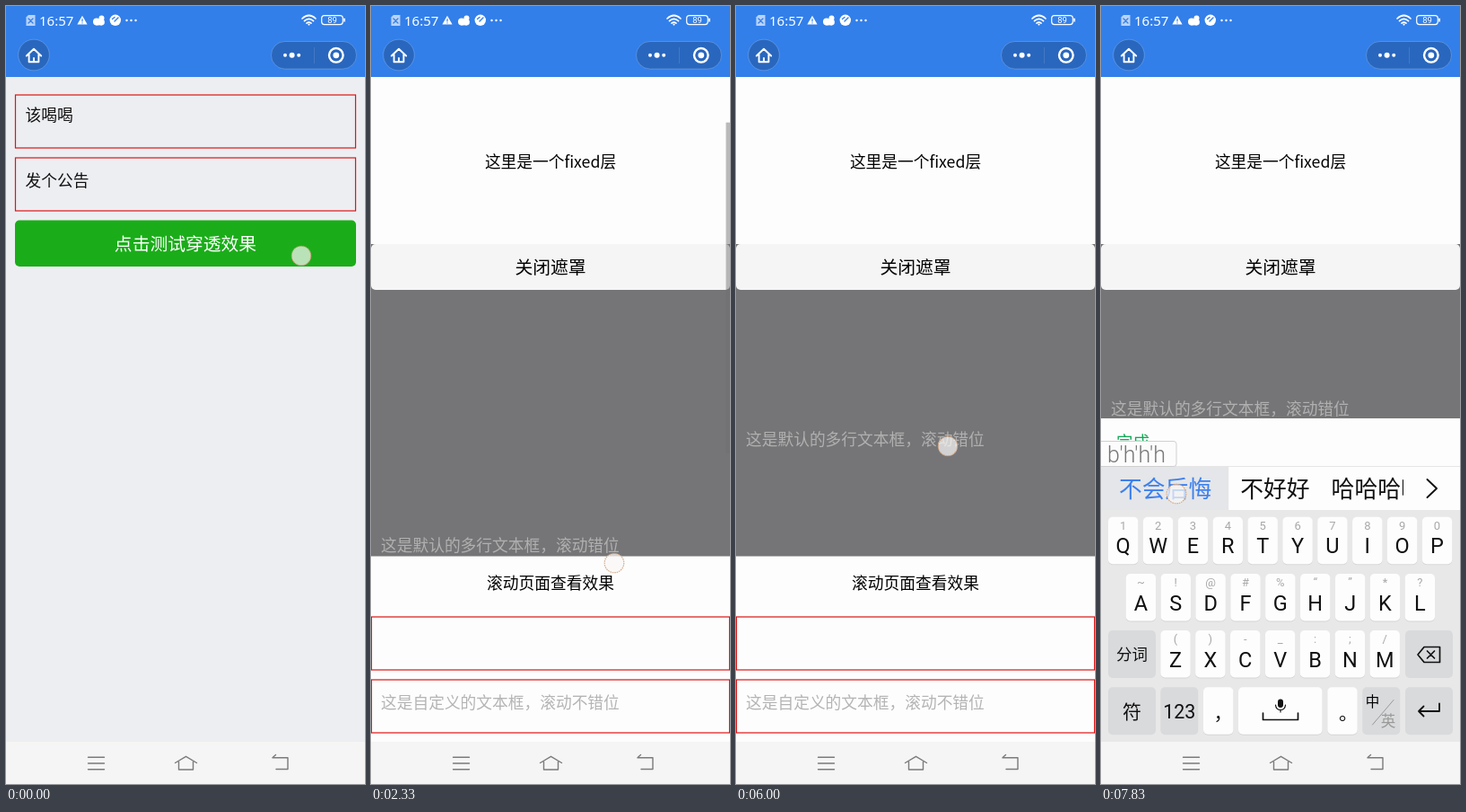
These frames come from a looping animation (400 by 866 pixels, 8000 ms). An HTML page:

```html
<!DOCTYPE html>
<html lang="zh-CN">
<head>
<meta charset="utf-8">
<style>
html, body { margin: 0; width: 100%; height: 100%; overflow: hidden; background: #edeef2; }
svg { display: block; width: 100vw; height: 100vh; font-family: "Noto Sans CJK SC", "Noto Sans CJK", "Noto Sans", sans-serif; }
.latin { font-family: Roboto, "Noto Sans", sans-serif; }
.line { fill: none; stroke-linecap: round; stroke-linejoin: round; }
</style>
</head>
<body>
<svg id="stage" viewBox="0 0 400 866" preserveAspectRatio="none"></svg>
<script>
const LOOP = 8000, FPS = 6;
const CJK = 17.73;

// Text centred vertically on y
const text = (s, x, y, size, fill = '#000', anchor = 'middle', extra = '') =>
  `<text x="${x}" y="${y + size * 0.37}" font-size="${size}" fill="${fill}" text-anchor="${anchor}" ${extra}>${s}</text>`;
const latin = (s, x, y, size, fill, anchor, extra = '') =>
  text(s, x, y, size, fill, anchor, 'class="latin" ' + extra);
const rect = (x, y, w, h, fill, r = 0, extra = '') =>
  `<rect x="${x}" y="${y}" width="${w}" height="${h}" rx="${r}" fill="${fill}" ${extra}/>`;
const dot = (x, y, r, fill, extra = '') => `<circle cx="${x}" cy="${y}" r="${r}" fill="${fill}" ${extra}/>`;
const line = (d, color = '#000', w = 1.6) =>
  `<path class="line" d="${d}" stroke="${color}" stroke-width="${w}"/>`;
const redBox = (x, y, w) => rect(x + .5, y + .5, w - 1, 59, 'none', 0, 'stroke="#dc1414" stroke-width="1.2"');

function header() {
  const blue = '#327fea', white = '#fff', glass = 'rgba(0,0,0,.19)';
  const rim = 'stroke="rgba(255,255,255,.2)"';
  return rect(0, 0, 400, 79, blue) +
    `<path d="M25 10H32.5V22H22.5V12.5Z" fill="#b9d3f8"/>` + line('M25 14L30 19M30 14L25 19', blue, 1.3) +
    text('16:57', 37, 16, 15, white, 'start', 'style="font-family:\'Noto Sans\',sans-serif"') +
    `<path d="M85 10.8L90.6 20.5H79.4Z" fill="#fff"/>` + line('M85 14.5V17M85 18.8V19', blue, 1.2) +
    dot(101, 17.5, 4, white) + dot(106.5, 18, 3.4, white) + dot(106.5, 13.5, 3, white) +
    rect(100, 17, 7, 4.4, white) +
    dot(121.8, 15.8, 6.2, white) + line('M121 17L125 13M118.5 14.5L121 12.5', blue, 1.4) +
    [134.5, 139.5, 144.5].map(x => dot(x, 16, 1.2, white)).join('') +
    line('M330 14Q337.5 7 345 14M332.5 16.7Q337.5 12 342.5 16.7M335 19.2Q337.5 17 340 19.2', white, 1.7) +
    dot(337.5, 20.6, 1.1, white) +
    rect(351.7, 10.6, 23.6, 10, 'none', 3, 'stroke="#fff" stroke-width="1.2"') + rect(376.3, 13.5, 1.6, 4.2, white, .8) +
    latin('89', 363.5, 15.7, 9.5, white) +
    dot(31, 54.5, 17.3, glass, rim) +
    line('M22.8 55.5L31 47.8L39.2 55.5M25.6 54V62.2H36.4V54M31 62V58', white, 1.9) +
    rect(295.5, 39.5, 95, 30.5, glass, 15.2, rim) +
    rect(343, 46, 1, 18, 'rgba(255,255,255,.12)') +
    dot(311, 54.7, 2, white) + dot(318.6, 54.7, 3, white) + dot(326.2, 54.7, 2, white) +
    dot(367.8, 54.8, 7.8, 'none', 'stroke="#fff" stroke-width="2.4"') + dot(367.8, 54.8, 3.4, white);
}

function navBar() {
  return rect(0, 819, 400, 47, '#f5f5f5') +
    line('M91.5 836.2H109.5M91.5 843H109.5M91.5 849.8H109.5M188.5 842.5L200.5 835.3L212.5 842.5M192.5 841V850H208.5V841M300.5 833.5L297 836.7H314V849.5H301', '#7b7b7b', 1.4);
}

const page = () =>
  rect(0, 79, 400, 740, '#edeef2') +
  redBox(10, 98.5, 380) + redBox(10, 168.5, 380) +
  text('该喝喝', 21.5, 121, CJK, '#111', 'start') + text('发个公告', 21.5, 194, CJK, '#111', 'start') +
  rect(10, 238.5, 380, 51.5, '#1aad19', 5) + text('点击测试穿透效果', 200, 265, 19.8, '#fff');

const mask = () =>
  rect(0, 79, 400, 740, '#757577') + rect(0, 79, 400, 186, '#fdfdfd') +
  text('这里是一个fixed层', 200, 173, CJK) +
  rect(0, 265, 400, 51, '#f5f5f5', 5) + text('关闭遮罩', 200, 291, 19.8) +
  rect(0, 612.5, 400, 206.5, '#fdfdfd') + text('滚动页面查看效果', 200, 642.5, CJK) +
  redBox(0, 679.5, 400) + redBox(0, 749.5, 400) +
  text('这是自定义的文本框，滚动不错位', 11, 775, CJK, '#b4b4b4', 'start');

function key(x, y, w, label, sub = '') {
  return rect(x, y + 1, w, 52.5, '#d6d6d6', 5) + rect(x, y, w, 52.5, '#fdfdfd', 5) +
    latin(sub, x + w / 2, y + 9.5, 13, '#a8a8a8') + latin(label, x + w / 2, y + 32, 23.5, '#111');
}
const greyKey = (x, y, w) => rect(x, y, w, 53, '#d9dadb', 5);
const keyRow = (x, y, letters, subs) =>
  [...letters].map((c, i) => key(x + i * 38.87, y, 33.4, c, subs[i])).join('');

function keyboard() {
  return rect(0, 459, 400, 360, '#fdfdfd') + text('完成', 17, 485.5, 18.6, '#12a858', 'start') +
    rect(0, 512, 400, 1, '#e6e6e6') +
    `<g id="tools">` +
    rect(30, 525, 23, 23, '#111') +
    dot(126, 536.5, 10.3, 'none', 'stroke="#111" stroke-width="1.7"') +
    line('M120.5 538.5Q126 546 131.5 538.5M121 533.5H123.5M128.5 533.5H131', '#111', 1.7) +
    rect(199, 527.5, 23, 18, 'none', 3, 'stroke="#111" stroke-width="1.7"') +
    line('M204 533H204.2M208.3 533H208.5M212.6 533H212.8M217 533H217.2M204 537H204.2M208.3 537H208.5M212.6 537H212.8M217 537H217.2M206 541.5H215', '#111', 1.8) +
    line('M294.3 528V546M290.5 527.5H298M290.5 546H298', '#111', 1.5) +
    `<path d="M287 532V541L280.5 536.5ZM302 532V541L308.5 536.5Z" fill="#111"/>` +
    rect(337, 524, 1, 25, '#ddd') + line('M360 532.5L369 541.5L378 532.5', '#111', 1.6) + `</g>` +
    rect(0, 561, 400, 258, '#e8e8e8') +
    keyRow(8, 568.7, 'QWERTYUIOP', '1234567890') +
    keyRow(27.7, 632, 'ASDFGHJKL', '~!@#%“”*?') +
    keyRow(66.3, 695, 'ZXCVBNM', '()-_:;/') +
    greyKey(8, 695, 53) + text('分词', 34.5, 722, 17.5, '#111') +
    greyKey(339, 695, 53) +
    line('M353 722L360 713.5H377.5V730.5H360ZM363.5 718L371.5 726M371.5 718L363.5 726', '#111', 1.7) +
    greyKey(8, 758.3, 53) + text('符', 34.5, 785, 21, '#111') +
    greyKey(66.3, 758.3, 42) + latin('123', 87.3, 785.5, 21.5, '#111') +
    key(114, 758.3, 33.4, '') + text('，', 136, 786, 21, '#111') +
    key(153, 758.3, 93.5, '') +
    rect(197, 771.5, 6, 9.5, '#111', 3) + line('M194.5 778Q195 783.5 200 783.5Q205 783.5 205.5 778M200 784V786', '#111', 1.2) +
    line('M180.5 787V794.5H219.5V787', '#111', 1.7) +
    key(252.3, 758.3, 33.4, '') + text('。', 275.5, 786, 21, '#111') +
    greyKey(291.2, 758.3, 42) + text('中', 302.5, 774.5, 15.5, '#000', 'middle', 'font-weight="500"') +
    line('M302.5 800L326 772.5', '#999', 1) + text('英', 320, 796, 16.5, '#999') +
    greyKey(339, 758.3, 53) + line('M377 776.5V785H354M359.5 779.5L354 785L359.5 790.5', '#111', 1.8);
}

const candidates = () =>
  `<g id="typing">` + rect(0, 513, 400, 48, '#fdfdfd') + `<g id="words" clip-path="url(#strip)"></g>` +
  line('M363.5 527L374 537L363.5 547', '#111', 1.9) + `<g id="compose"></g></g>`;

stage.innerHTML =
  `<defs><clipPath id="strip"><rect x="0" y="513" width="337" height="48"/></clipPath>
   <clipPath id="view"><rect x="0" y="79" width="400" height="740"/></clipPath></defs>` +
  page() + `<g id="overlay">` + mask() +
  `<g id="hint">` + text('这是默认的多行文本框，滚动错位', 11, 0, CJK, '#b0b0b0', 'start') + `</g>` +
  rect(11.5, 438, 1.2, 19, '#4a7fb0', 0, 'id="caret"') +
  rect(395.5, 0, 4.5, 368, 'rgba(112,112,114,.48)', 0, 'id="bar"') + `</g>` +
  `<g clip-path="url(#view)"><g id="keys">` + keyboard() + candidates() + `</g></g>` +
  header() + navBar() +
  `<g id="touch">` + dot(0, 0, 10.8, 'rgba(248,247,245,.72)', 'stroke="rgba(205,150,108,.85)" stroke-width="1.1" stroke-dasharray="1.6 .9"') + `</g>`;

const el = id => document.getElementById(id);
const show = (id, on) => el(id).setAttribute('visibility', on ? 'visible' : 'hidden');
const move = (id, x, y) => el(id).setAttribute('transform', `translate(${x} ${y})`);

// Keys are [step, value, ...], linear in between
function track(keys, n) {
  let a = keys[0];
  for (const b of keys) {
    if (n < b[0]) {
      const k = Math.max(0, (n - a[0]) / (b[0] - a[0] || 1));
      return a.map((v, i) => v + (b[i] - v) * k).slice(1);
    }
    a = b;
  }
  return a.slice(1);
}

const REST = 705;
const hintPath = [[7, REST], [9, 635], [14, 600], [17, 662], [18, 655], [21, 564], [22, 487], [23, 482],
  [24, 482], [28, 703], [31, 482], [37, 482], [38, 448]];
const touches = [
  [[0, 329, 278]],
  [[8, 273, 690], [9, 272, 636], [14, 271, 620], [17, 270, 671], [18, 270, 664], [21, 267, 575], [22, 266, 496]],
  [[25, 254, 510], [28, 250, 712], [30, 240, 556]],
  [[35, 236, 490], [36, 236, 490]],
  [[41, 239, 727], [42, 239, 727]],
  [[43, 240, 668], [45, 240, 668]],
  [[47, 84, 543]]
];
const suggestions = [['不', '吧', '被', '把'], ['不会', '保护', '变化'], ['不好好', '不会后', '哈哈'], ['不会后悔', '不好好', '哈哈哈哈']];

let typed = -1;
function type(count) {
  if (count === typed) return;
  typed = count;
  show('tools', !count);
  show('typing', count > 0);
  if (!count) return;
  const size = 25.8, s = "b" + "'h".repeat(count - 1), w = 24 + count * 15;
  let x = 20;
  el('words').innerHTML = suggestions[count - 1].map((word, i) => {
    const len = word.length * size, at = x;
    x += len + (i ? 24 : 32);
    return (i ? '' : rect(0, 513, len + 39, 48, '#e5e6e9')) +
      text(word, at, 537.5, size, i ? '#111' : '#3c80ee', 'start');
  }).join('');
  el('compose').innerHTML = rect(-4, 484.5, w + 4, 28, '#fcfcfc', 3, 'stroke="#d0d0d0"') +
    latin(s, 7, 499, 25, '#777', 'start', 'font-weight="300"');
}

function draw(t) {
  const n = Math.floor((t + 7) * FPS / 1000) % (LOOP * FPS / 1000);
  const [y] = track(hintPath, n);
  show('overlay', n >= 1);
  move('hint', 0, y);
  el('bar').setAttribute('y', 77.5 + (REST - y) * .497);
  el('bar').setAttribute('opacity', (n >= 8 && n < 31) || (n >= 38 && n < 41) ? 1 : 0);
  el('caret').setAttribute('opacity', n >= 38 && n < 42 ? 1 : 0);
  move('keys', 0, n < 37 ? 400 : n < 38 ? 170 : 0);
  type(Math.max(0, Math.min(4, n - 41)));
  const path = touches.find(p => n >= p[0][0] && n <= p[p.length - 1][0]);
  show('touch', !!path);
  if (path) move('touch', ...track(path, n));
}

const start = performance.now();
(function tick() {
  draw((performance.now() - start) % LOOP);
  requestAnimationFrame(tick);
})();
</script>
</body>
</html>
```
